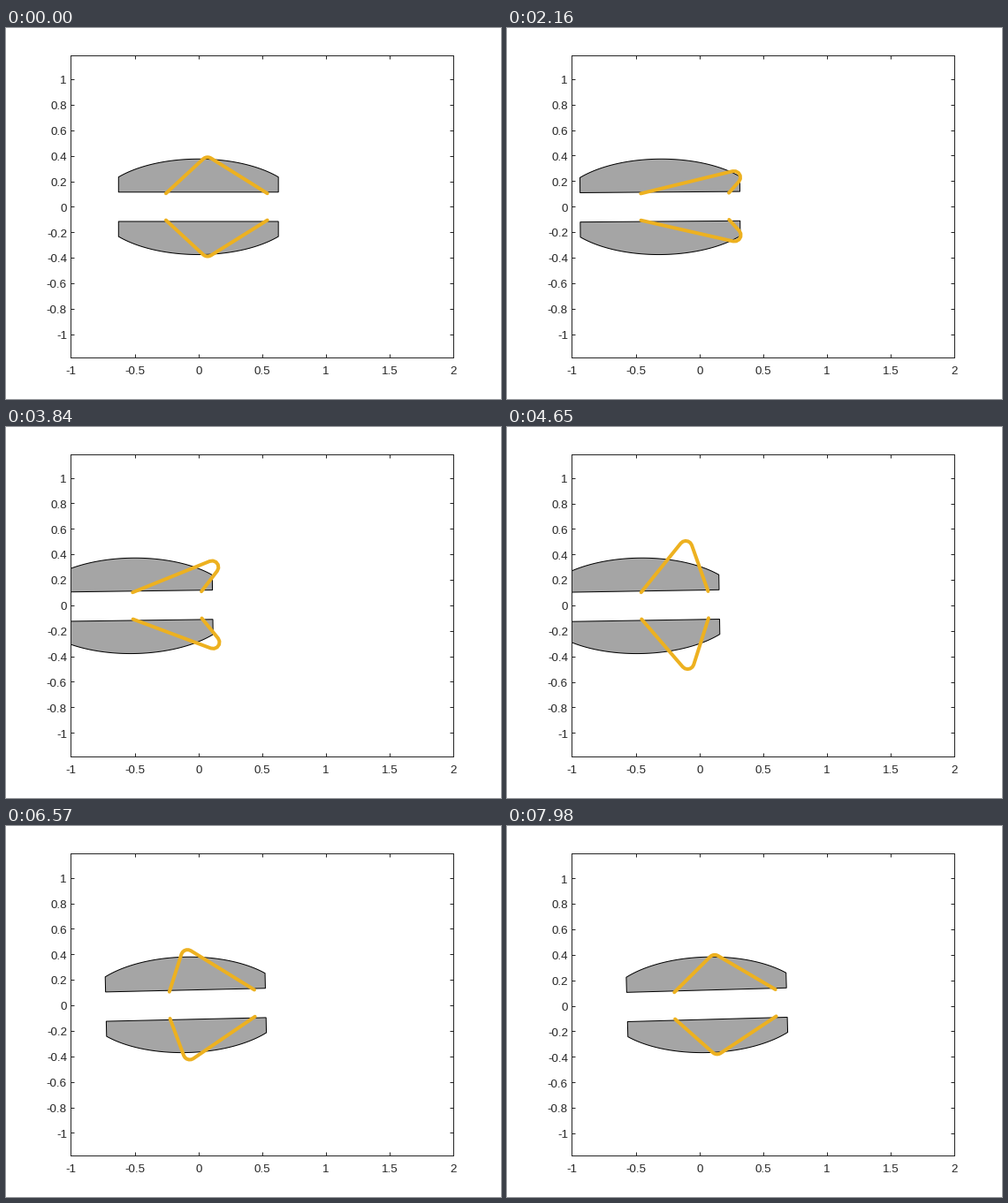
Animation, 560 px wide and 420 px high, one loop 8010 ms. Source, as a matplotlib script:

```python
from math import erf, log, pi, sqrt

import numpy as np
import matplotlib.pyplot as plt
from matplotlib.animation import FuncAnimation
from matplotlib.transforms import ScaledTranslation

W, H, DPI = 560, 420, 100
PX = 72 / DPI
FRAMES, STEP = 267, 30
HALF_GAIT = 4.0
HALF_Y = 3 * 342 / 433 / 2
INK = "#262626"

# Hull (a cut ellipse) and folding strip, in body coordinates
HULL_X, HULL_A, HULL_B, GAP = 0.6265, 0.8, 0.375, 0.115
HINGE, BASE, LENGTH, RADIUS = 0.54, 0.105, 0.985, 0.05
TURN_RATE = 0.0035


def glide(t, v_old, v_new, drag, c):
    """Distance covered: the old speed fades out, the new one decays by drag."""
    fade = c * sqrt(pi) / 2 * erf(t / c)
    return np.sign(v_new) * log(1 + abs(v_new) * drag * t) / drag + (v_old - v_new) * fade


def body_x(t):
    x = glide(min(t, HALF_GAIT), 0.1, -0.23, 1.277, 0.26)
    if t > HALF_GAIT:
        x += glide(t - HALF_GAIT, -0.106, 0.51, 2.15, 0.348)
    return x


def slider(t):
    slide = np.clip(t - 1, 0, 3) - np.clip(t - 5, 0, 3)
    return -0.255 + 0.09 * slide


def hinge_angle(t):
    return np.radians(np.interp(t, [0, 1.25, 4, 5, 6.5, 8],
                                [148, 46, 52, 139, 147, 148]))


def strip(t):
    """Two straight parts joined by a round fold, with constant total length."""
    s, beta = slider(t), hinge_angle(t)
    lo, hi = 0.05, 0.95
    for _ in range(40):
        b = (lo + hi) / 2
        vx, vy = HINGE + b * np.cos(beta), b * np.sin(beta)
        alpha = np.arctan2(vy, vx - s)
        turn = pi - beta + alpha
        tan = RADIUS * np.tan(turn / 2)
        total = np.hypot(vx - s, vy) + b - 2 * tan + RADIUS * turn
        lo, hi = (b, hi) if total < LENGTH else (lo, b)
    cx = vx - tan * np.cos(alpha) + RADIUS * np.sin(alpha)
    cy = vy - tan * np.sin(alpha) - RADIUS * np.cos(alpha)
    a = np.linspace(alpha + pi / 2, beta - pi / 2, 6)
    x = np.r_[s, cx + RADIUS * np.cos(a), HINGE]
    y = np.r_[0, cy + RADIUS * np.sin(a), 0] + BASE
    return x, y


times = np.arange(FRAMES) * STEP / 1000
heading = TURN_RATE * times
xs = np.array([body_x(t) for t in times])
ys = np.r_[0, np.cumsum(np.diff(xs) * heading[1:])]

arc = np.linspace(-HULL_X, HULL_X, 80)
hull_x = np.r_[-HULL_X, arc, HULL_X]
hull_y = np.r_[GAP, HULL_B * np.sqrt(1 - (arc / HULL_A) ** 2), GAP]

plt.rcParams["font.family"] = "Liberation Sans"
fig = plt.figure(figsize=(W / DPI, H / DPI), dpi=DPI, facecolor="white")
ax = fig.add_axes([73.4 / W, (H - 373.4) / H, 433 / W, 342 / H])
ax.set_xlim(-1, 2)
for side in ax.spines.values():
    side.set(linewidth=PX, color=INK)
ax.tick_params(direction="in", top=True, right=True, length=4.3 * PX,
               width=PX, color=INK, labelcolor=INK, labelsize=13.33 * PX)
ax.tick_params(axis="x", pad=10 * PX)
ax.tick_params(axis="y", pad=4.5 * PX)
xt = np.arange(-2, 5) / 2
yt = np.arange(-5, 6) / 5
ax.set_xticks(xt, [f"{v:g}" for v in xt])
ax.set_yticks(yt, [f"{v:g}" for v in yt])
nudge = ScaledTranslation(0, -0.8 / DPI, fig.dpi_scale_trans)
for label in ax.get_yticklabels():
    label.set_transform(label.get_transform() + nudge)

hulls = [ax.fill(hull_x, hull_y, fc="#a5a5a5", ec="black", lw=PX,
                 joinstyle="miter", zorder=2)[0] for _ in range(2)]
strips = [ax.plot([], [], color="#EDB120", lw=4 * PX, solid_capstyle="round",
                  solid_joinstyle="round", zorder=3)[0] for _ in range(2)]


def place(x, y, i):
    c, s = np.cos(heading[i]), np.sin(heading[i])
    return xs[i] + c * x - s * y, ys[i] + s * x + c * y


def draw(i):
    x, y = strip(times[i])
    for sign, hull, line in zip((1, -1), hulls, strips):
        hull.set_xy(np.column_stack(place(hull_x, sign * hull_y, i)))
        line.set_data(*place(x, sign * y, i))
    ax.set_ylim(ys[i] - HALF_Y, ys[i] + HALF_Y)
    return hulls + strips


anim = FuncAnimation(fig, draw, frames=FRAMES, interval=STEP, repeat=True,
                     repeat_delay=0, blit=False)
plt.show()
```
